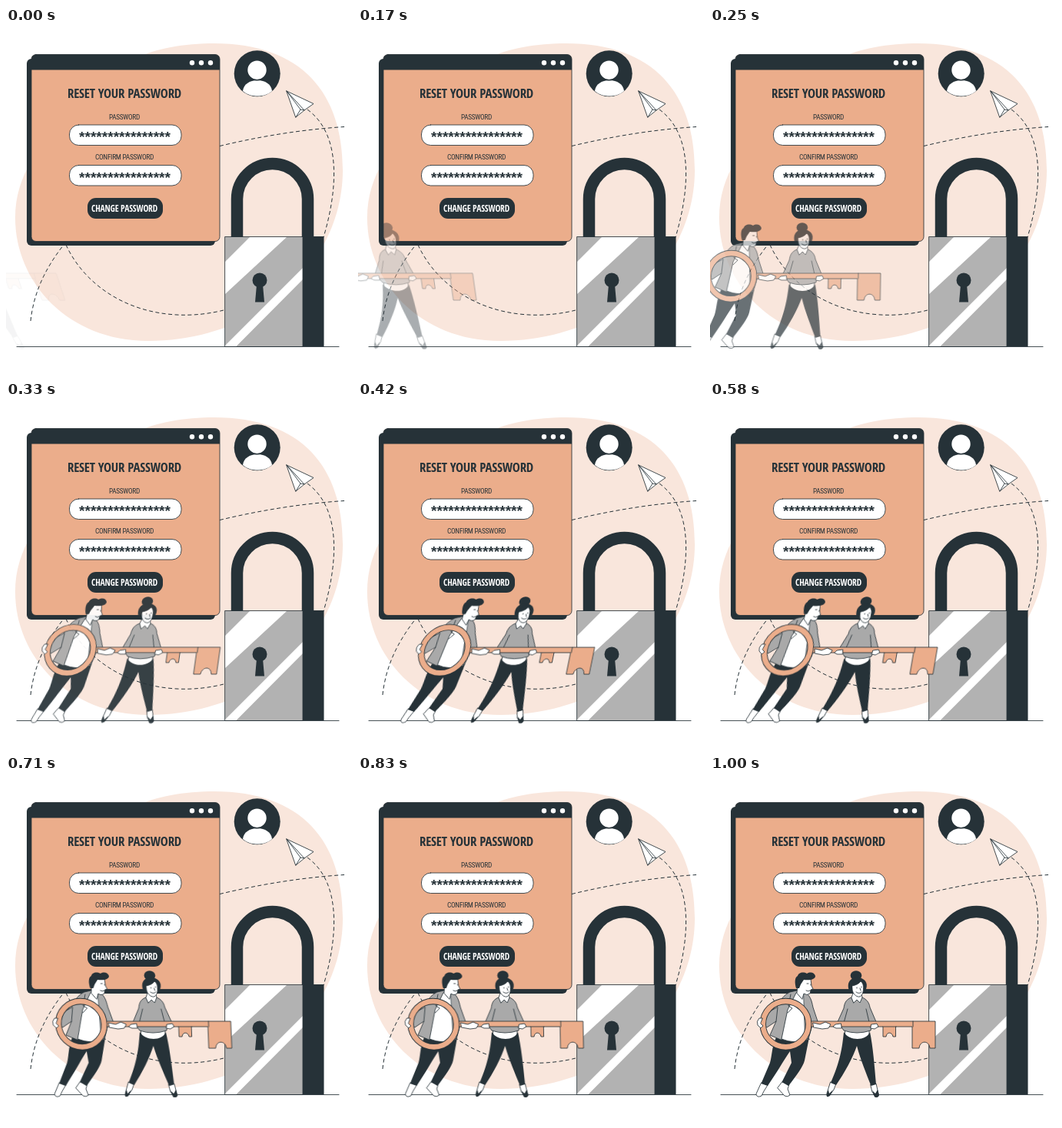
An HTML page that plays this animation: 450x450 px, repeating every 1040 ms.

```html
<!DOCTYPE html>
<html lang="en">
<head>
<meta charset="utf-8">
<title>Reset your password</title>
<style>
  html, body { margin: 0; width: 100%; height: 100%; overflow: hidden; background: #fff; }
  svg { display: block; width: 100vw; height: 100vh; }

  .dark { fill: #263238; }
  .white { fill: #fff; }
  .peach { fill: #ebad8b; }
  .grey { fill: #a9a9a9; }
  .ink { stroke: #263238; stroke-width: .85; stroke-linejoin: round; stroke-linecap: round; }
  .line { fill: none; }
  .dash { fill: none; stroke: #263238; stroke-dasharray: 5 3.4; }

  text { text-anchor: middle; font-stretch: 75%; }
  .bold {
    font-family: "Open Sans Condensed", "Open Sans", "Roboto Condensed", sans-serif;
    font-weight: 700;
    letter-spacing: -.015em;
  }
  .label { font-family: "Roboto Condensed", Roboto, "Noto Sans", sans-serif; letter-spacing: -.03em; }
  .stars { font: 700 19.1px "Liberation Sans", Arial, sans-serif; }

  #pushers {
    transform-origin: 177px 336px;
    animation: rush 1s cubic-bezier(.36, -.01, .5, 1.38) both paused;
  }
  @keyframes rush {
    0%   { transform: translateX(-236px) skewX(20deg); opacity: 0; }
    60%  { transform: translateX(0) skewX(-10deg); opacity: 1; }
    80%  { transform: translateX(0) skewX(2deg); opacity: 1; }
    100% { transform: translateX(0) skewX(0); opacity: 1; }
  }
</style>
</head>
<body>
<svg viewBox="0 0 450 450">
  <path fill="#f9e6dc" d="M12 247C12 190 45 150 90 100C135 50 180 22 265 20C385 18 438 85 438 185C438 260 395 330 330 368C290 392 240 407 185 407C80 407 12 330 12 247Z"/>

  <g class="dash">
    <path d="M278 153.500C330 141 385 132 440 128.500"/>
    <path d="M392 106C436 138 432 208 413 272"/>
    <path d="M32 381C36 345 50 314 75 282"/>
    <path d="M78 282C100 330 150 367 215 372.500C243 375 268 371 285 366.500"/>
  </g>

  <!-- Window -->
  <rect class="dark" x="27" y="40" width="245" height="243" rx="6"/>
  <rect class="peach ink" x="33" y="34.500" width="245" height="243" rx="6"/>
  <path class="dark" d="M33 54.500V40.500a6 6 0 0 1 6 -6H272a6 6 0 0 1 6 6V54.500Z"/>
  <g class="white">
    <circle cx="242" cy="45.300" r="3.200"/>
    <circle cx="254" cy="45.300" r="3.200"/>
    <circle cx="266" cy="45.300" r="3.200"/>
  </g>
  <g class="white ink">
    <rect x="82.500" y="126" width="145.500" height="26.500" rx="12"/>
    <rect x="82.500" y="178.500" width="145.500" height="26.500" rx="12"/>
  </g>
  <rect class="dark" x="106" y="221" width="98" height="27" rx="11"/>
  <g class="dark">
    <text class="bold" x="154" y="90.800" data-width="148">RESET YOUR PASSWORD</text>
    <text class="label" x="154" y="118.500" data-width="40">PASSWORD</text>
    <text class="label" x="154" y="171" data-width="76">CONFIRM PASSWORD</text>
    <text class="stars" x="154.500" y="148">****************</text>
    <text class="stars" x="154.500" y="200.500">****************</text>
  </g>
  <text class="bold white" x="154" y="239.300" data-width="86">CHANGE PASSWORD</text>

  <!-- Account badge and paper plane -->
  <circle class="dark" cx="326.700" cy="59.200" r="30"/>
  <path class="white" d="M308 82C309 73 317 68 327 68S345 73 346 82C341 86.500 334 88.500 327 88.500S313 86.500 308 82Z"/>
  <circle cx="326.500" cy="54.700" r="13" fill="#fff" stroke="#263238" stroke-width="1.600"/>
  <path class="white ink" d="M365 82L400 98.500L388 107L377 116ZL383 106L377 116M365 82L388 107L383 106"/>

  <!-- Padlock -->
  <path class="line" stroke="#263238" stroke-width="15.500" d="M300.500 272V222.500a46 46 0 0 1 92 0V272"/>
  <rect x="285" y="272" width="101" height="142.500" fill="#b2b2b2"/>
  <path class="white" d="M285 304L317 272H365L285 346ZM386 312V327L299 414.500H285V413Z"/>
  <rect class="line ink" x="285" y="271.500" width="101" height="143"/>
  <rect class="dark" x="386" y="271" width="27.500" height="143.500"/>
  <circle class="dark" cx="330" cy="328" r="9.500"/>
  <path class="dark" d="M326 334H334L336 356.500H324Z"/>

  <path class="ink" d="M14 414.500H433"/>

  <g id="pushers">
    <!-- Woman -->
    <path class="white ink" d="M157 398L164 400L161 408L156 415Q152 417 152 413ZM209 401L216 400L219 413Q220 418 215 417L211 411ZM176 328H207V345H176Z"/>
    <path class="dark" d="M154 408L155 413L160 408L156 416Q151 419 151.500 414ZM211 409L215 413L218 408L220 415Q219 419 214 417.500Z"/>
    <path class="dark" d="M174 333C172 354 169 372 157 399L164 402C175 386 186 366 191 351C196 370 203 386 209.500 403L216 401C214 378 212 352 208 333C203 345 181 345 174 333Z"/>
    <path class="grey ink" d="M184 288C178 290 175 294 174 302L165 322L172 328L174 331Q191 337 209 331L210 327L217 322L208 301C207 294 203 290 198 288Z"/>
    <path class="line ink" d="M179 303L174 321M203 303L207 320"/>
    <path class="white ink" d="M184 288L187 280H196L198 288L195 295L191 291L187 295Z"/>
    <ellipse class="dark" cx="190" cy="259.500" rx="7.300" ry="6.300"/>
    <path class="dark" d="M181 279C177 269 183 262 191 262C201 262 206 269 203 277L196 283H184Z"/>
    <path class="white ink" d="M185 273C190 272 194 270 196 267C199 269 200 273 199.500 278C199 284 196 288 192.500 287C188 286 185 281 185 277Z"/>
    <path class="line ink" d="M191 275V276M197 274V275M195 276L196 279M190 281Q194 284 197 281"/>

    <!-- Man -->
    <path class="white ink" d="M67 399L75 402L70 410L67 416Q61 419 60 414ZM94 398L103 401L101 407L104 415Q101 418 97 416L88 406Z"/>
    <path class="dark" d="M87 338C80 352 81 363 78 373L66.500 400L75 403C86 387 94 373 104 358L106 373L93.500 398L102 403C113 389 121 378 123 370L129 340Z"/>
    <path class="grey ink" d="M113 279L104 281C96 285 91 291 87 301L69 311L66 322L74 327L86 319L78 337L92 343L105 340L119 285Z"/>
    <path class="white ink" d="M112 282L101 304L93 342Q110 349 127 343L130 308L125 283Z"/>
    <path class="grey ink" d="M122 281C130 284 132 291 134 301L140 319L133 324L128 342L124 341Z"/>
    <path class="line ink" d="M105 284L102 299L107 302L101 308M88 301L86 319"/>
    <path class="white ink" d="M113 282L114 272L119 264L131 264L132 273L134 277L131 278L130 283Q126 286 122 283L120 290Z"/>
    <path class="dark" d="M112 276C110 269 110 262 114 260C115 256 121 254 126 257C131 254 136 256 137 260C137 264 132 266 122 265L118 271L116 276Z"/>
    <path class="line ink" d="M126 270H128M131 271V272M125 279Q128 281 130 279M117 271Q114 270 115 275"/>

    <!-- Key -->
    <path class="peach ink" d="M131 319H293V354H286C285 343.500 273 343.500 272 354H263V326H241.500V339H238C237 332.500 229.500 332.500 229 339H225V326H131Z"/>
    <path class="line ink" d="M225 326H242M264 319V326"/>
    <g class="line">
      <circle cx="98.500" cy="322.700" r="29.700" stroke="#263238" stroke-width="8.400"/>
      <circle cx="98.500" cy="322.700" r="29.700" stroke="#ebad8b" stroke-width="6.600"/>
    </g>

    <!-- Hands -->
    <g class="white ink">
      <path d="M68 315L64 315Q60 319 62 324L66 328L69 325L66 322Z"/>
      <path d="M134 321L143 323L150 320L157 323L154 328L146 329L135 327Z"/>
      <path d="M170 322L163 323L160 326L164 328L171 328Z"/>
      <path d="M210 323L217 322L219 326L214 329L209 328Z"/>
    </g>
  </g>
</svg>
<script>
  const LOOP = 1040;
  const FPS = 24;
  const LAG = 0.006;
  const pushers = document.getElementById("pushers");

  // Pick the font size that gives each label its width.
  for (const label of document.querySelectorAll("[data-width]")) {
    label.style.fontSize = "100px";
    label.style.fontSize = 100 * label.dataset.width / label.getComputedTextLength() + "px";
  }

  // Motion advances in held steps of 1/24 s.
  function draw(now) {
    const step = Math.max(1, Math.floor((now % LOOP + 4) * FPS / 1000)) + 1;
    pushers.style.animationDelay = `${LAG - step / FPS}s`;
    requestAnimationFrame(draw);
  }
  draw(performance.now());
</script>
</body>
</html>
```
